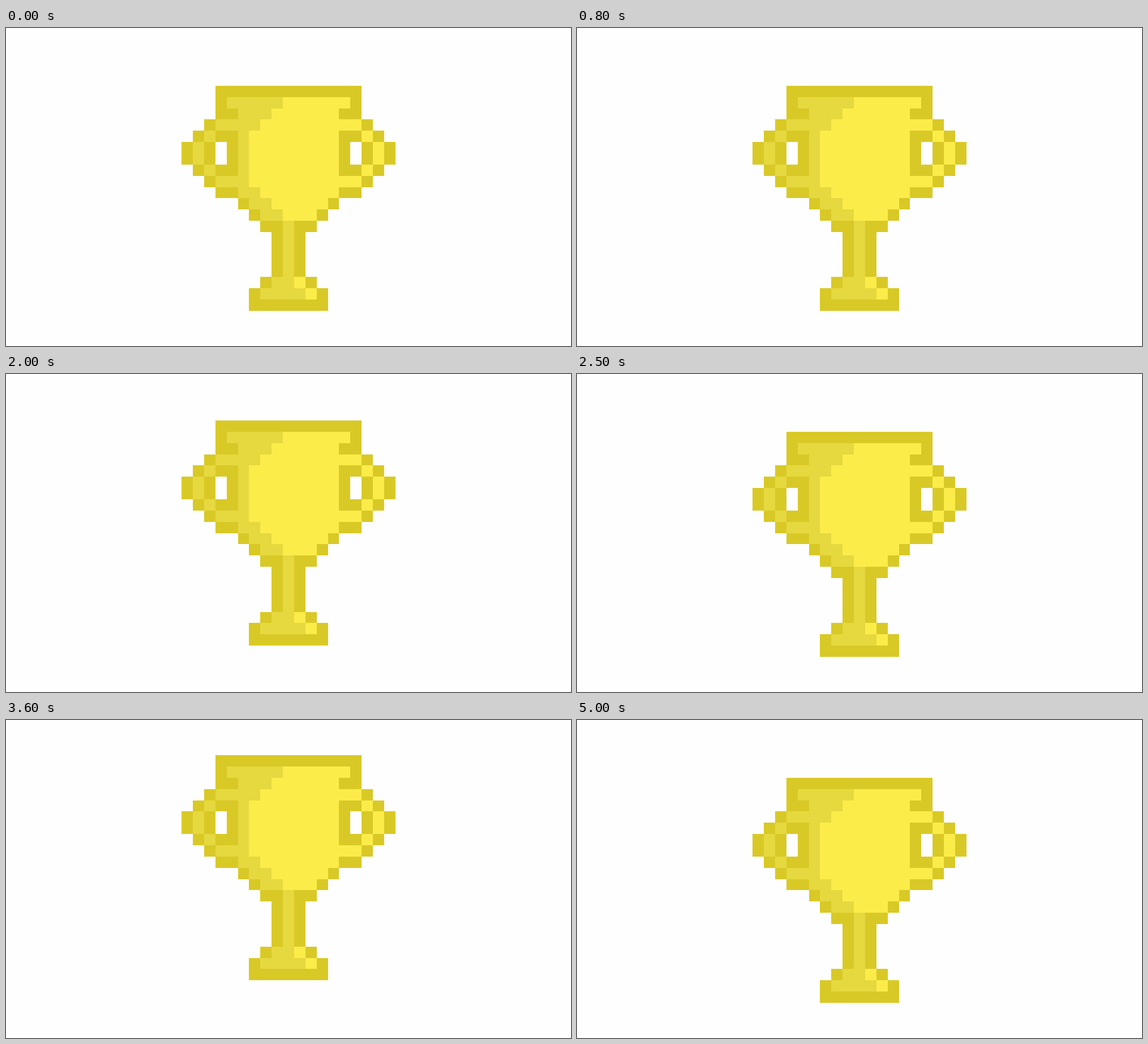
An HTML page for the animation above (5110 ms loop, 998 by 561 pixels).

```html
<!DOCTYPE html>
<html lang="en">
<head>
<meta charset="utf-8">
<title>Pixel trophy</title>
<style>
  html, body { margin: 0; width: 100%; height: 100%; overflow: hidden; background: #fefefe; }
  svg { display: block; width: 998px; height: 561px; shape-rendering: crispEdges; }
  .edge { fill: #d9c926; fill-rule: evenodd; }
  .shade { fill: #e6d83f; }
  .light { fill: #fcec49; }
  .shine { fill: #fefefe; visibility: hidden; }
</style>
</head>
<body>
<svg viewBox="0 0 998 561">
  <!-- One unit is one cell of the pixel art -->
  <g id="cup">
    <path class="edge" d="M3 0H16V3H17V4H18V5H19V7H18V8H17V9H16V10H14V11H13V12H12V13H11V17H12V18H13V20H6V18H7V17H8V13H7V12H6V11H5V10H3V9H2V8H1V7H0V5H1V4H2V3H3Z M3 5V7H4V5Z M15 5V7H16V5Z"/>
    <path class="shade" d="M4 1H15V2H14V3H16V4H14V8H16V9H14V10H13V11H12V12H10V17H11V18H12V19H7V18H8V17H9V12H7V11H6V10H5V9H3V8H5V4H3V3H5V2H4Z M2 4H3V5H2V7H3V8H2V7H1V5H2Z"/>
    <path class="light" d="M9 1H15V2H14V3H16V4H14V8H16V9H14V10H13V11H12V12H9V11H8V10H7V9H6V4H7V3H8V2H9Z M16 4H17V5H18V7H17V8H16V7H17V5H16Z M10 17H11V18H12V19H11V18H10Z"/>
    <path class="shine" d="M12 1H14V2H13V3H12V4H11V5H10V6H9V7H8V8H7V9H6V10H5V8H6V7H7V6H8V5H9V4H10V3H11V2H12Z"/>
    <path class="shine" d="M14 3H16V4H14V6H13V7H12V8H11V9H10V10H9V11H8V12H7V10H8V9H9V8H10V7H11V6H12V5H13V4H14Z"/>
    <path class="shine" d="M13 8H15V9H14V10H13V11H12V12H10V11H11V10H12V9H13Z"/>
  </g>
</svg>
<script>
  const LOOP = 5110, TICK = 100, CYCLE = 17, SHINE_AT = 13;
  const CELL_W = 19.88, CELL_H = 19.86, LEFT = 310.1, TOP = 101.8;
  const BOB = [0, 1, 2, 1];
  const cup = document.getElementById('cup');
  const shines = document.querySelectorAll('.shine');

  function draw() {
    const t = performance.now() % LOOP;
    const step = Math.min(Math.floor(t / TICK), 3 * CYCLE - 1) % CYCLE;
    const lift = step < SHINE_AT ? BOB[step % BOB.length] : 0;
    cup.setAttribute('transform',
      `translate(${LEFT} ${TOP - lift * CELL_H}) scale(${CELL_W} ${CELL_H})`);
    shines.forEach((s, i) => {
      s.style.visibility = step === SHINE_AT + i ? 'visible' : 'hidden';
    });
    requestAnimationFrame(draw);
  }
  draw();
</script>
</body>
</html>
```
